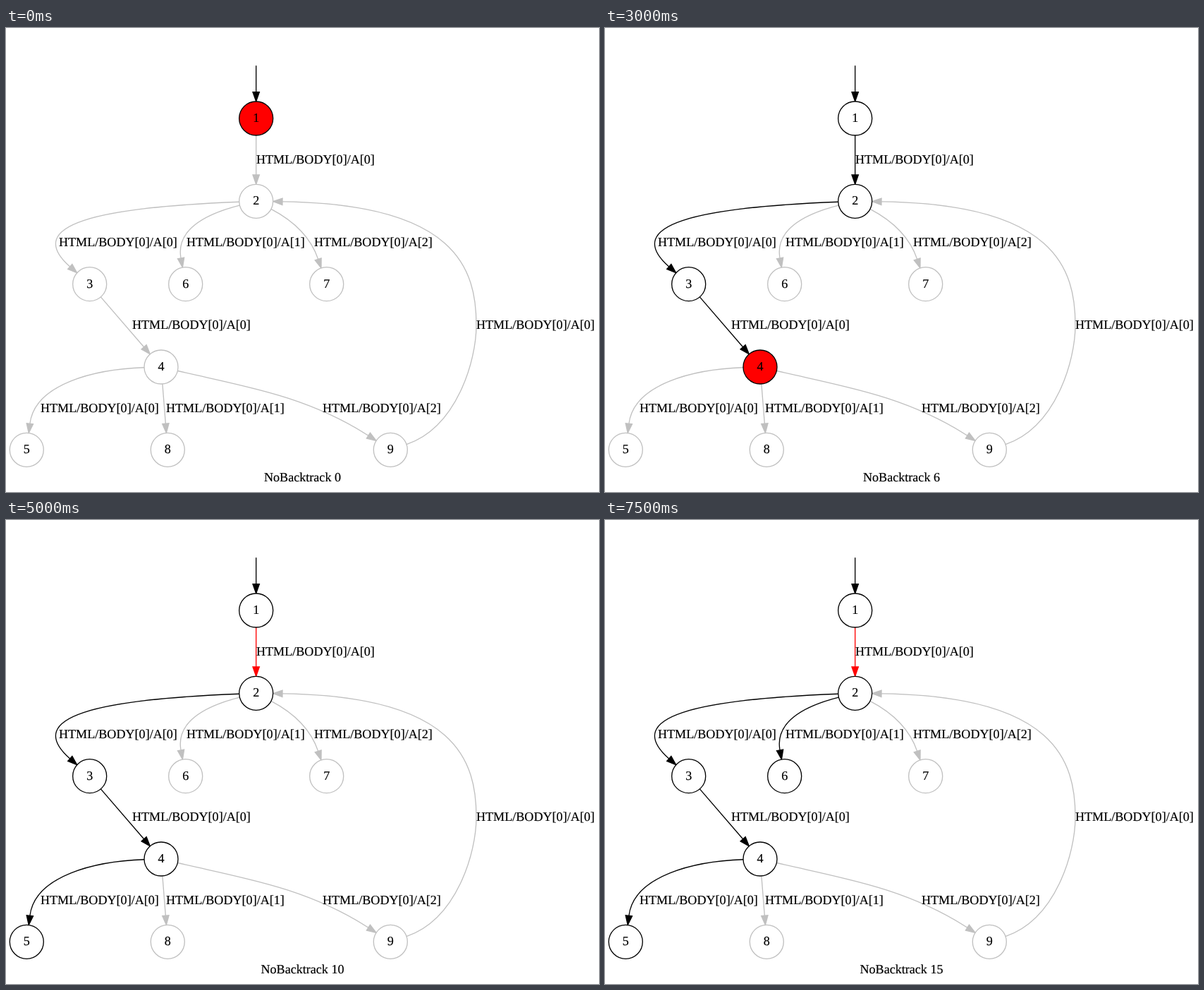
These frames come from a looping animation (841 by 657 pixels, 8 s). An HTML page:

```html
<!DOCTYPE html>
<html lang="en">
<head>
<meta charset="utf-8">
<title>Graph walk</title>
<style>
  html, body { margin: 0; width: 100%; height: 100%; overflow: hidden; background: #fff; }
  svg { display: block; width: 841px; height: 657px; }
  text {
    font: 18.1px "Liberation Serif", "Times New Roman", serif;
    font-kerning: none;
    text-rendering: geometricPrecision;
    stroke: #000;
    stroke-width: .2;
  }
  .mid { text-anchor: middle; }
  .part { --ink: #c0c0c0; stroke: var(--ink); stroke-width: 1.33; }
  .part path { fill: none; }
  .part polygon { fill: var(--ink); }
  .part circle { fill: #fff; }
  .part.seen { --ink: #000; }
  .edge.active { --ink: #f00; }
  .node.active circle { fill: #f00; }
</style>
</head>
<body>
<svg id="stage" viewBox="0 0 841 657"></svg>
<script>
const STEP = 500, RADIUS = 24, ROW_GAP = 352 / 3;
const HEAD_LENGTH = 13.3, HEAD_HALF = 4.67;

// The walk follows each path from the first node, alternating nodes and edges.
const ROUTE = ['12345', '126', '12'].flatMap(path =>
  [...path].flatMap((n, i) => i ? [path[i - 1] + '-' + n, n] : [n])).slice(0, -1);

// One entry per row: node name and its x
const ROWS = [
  { 1: 354.7 },
  { 2: 354.7 },
  { 3: 118.7, 6: 254.7, 7: 454.7 },
  { 4: 220 },
  { 5: 29.3, 8: 229.3, 9: 545.3 }
];

const stage = document.getElementById('stage');
const parts = {}, nodes = {}, linkCount = {};

ROWS.forEach((row, i) => {
  for (const id in row) nodes[id] = [row[id], 128 + i * ROW_GAP];
});

function add(parent, tag, attrs, text) {
  const el = document.createElementNS('http://www.w3.org/2000/svg', tag);
  for (const key in attrs) el.setAttribute(key, attrs[key]);
  if (text !== undefined) el.textContent = text;
  return parent.appendChild(el);
}

// Point at a distance from a, on the way to b
function toward([ax, ay], [bx, by], distance) {
  const k = distance / Math.hypot(bx - ax, by - ay);
  return [ax + (bx - ax) * k, ay + (by - ay) * k];
}

const baseline = y => Math.floor(y + 5.4);

// Runs from rim to rim; bends are the Bezier control points between them.
function drawArrow(id, from, to, bends = []) {
  const start = toward(from, bends[0] || to, RADIUS);
  const aim = bends.at(-1) || from;
  const tip = toward(to, aim, RADIUS);
  const base = toward(to, aim, RADIUS + HEAD_LENGTH);
  const [nx, ny] = toward([0, 0], [base[1] - tip[1], tip[0] - base[0]], HEAD_HALF);
  const [bx, by] = base;

  const group = parts[id] = add(stage, 'g', { class: 'part edge' });
  add(group, 'path', { d: `M${start} ${bends.length ? 'C' : 'L'}${[...bends, base].join(' ')}` });
  add(group, 'polygon', { points: `${bx + nx},${by + ny} ${tip} ${bx - nx},${by - ny}` });
}

function drawEdge(a, b, labelX, ...bends) {
  const from = nodes[a], to = nodes[b];
  const link = linkCount[a] = (linkCount[a] ?? -1) + 1;
  drawArrow(`${a}-${b}`, from, to, bends);
  add(stage, 'text', { x: labelX, y: baseline((from[1] + to[1]) / 2) },
      `HTML/BODY[0]/A[${link}]`);
}

function drawNode(id) {
  const [x, y] = nodes[id];
  parts[id] = add(stage, 'g', { class: 'part node' });
  add(parts[id], 'circle', { cx: x, cy: y, r: RADIUS });
  add(stage, 'text', { x, y: baseline(y), class: 'mid' }, id);
}

drawArrow('in', [nodes[1][0], 29.3], nodes[1]);
drawEdge(1, 2, 355);
drawEdge(2, 3, 75, [130, 254], [23, 278]);
drawEdge(2, 6, 256, [280, 264], [241, 287]);
drawEdge(2, 7, 437, [398, 268], [430, 290]);
drawEdge(3, 4, 179);
drawEdge(4, 5, 49, [128, 483], [41, 503]);
drawEdge(4, 8, 227);
drawEdge(4, 9, 449, [335, 507], [425, 520]);
drawEdge(9, 2, 667, [640, 565], [667, 470], [667, 421], [667, 342], [640, 249]);
Object.keys(nodes).forEach(drawNode);

const caption = add(stage, 'text', { x: 420.5, y: 642, class: 'mid' });
let shown = -1;

function show(step) {
  const seen = new Set(['in', ...ROUTE.slice(0, step + 1)]);
  for (const id in parts) {
    parts[id].classList.toggle('seen', seen.has(id));
    parts[id].classList.toggle('active', id === ROUTE[step]);
  }
  caption.textContent = `NoBacktrack ${step}`;
  shown = step;
}

function tick() {
  const step = Math.floor(performance.now() / STEP) % ROUTE.length;
  if (step !== shown) show(step);
  requestAnimationFrame(tick);
}
tick();
</script>
</body>
</html>
```
